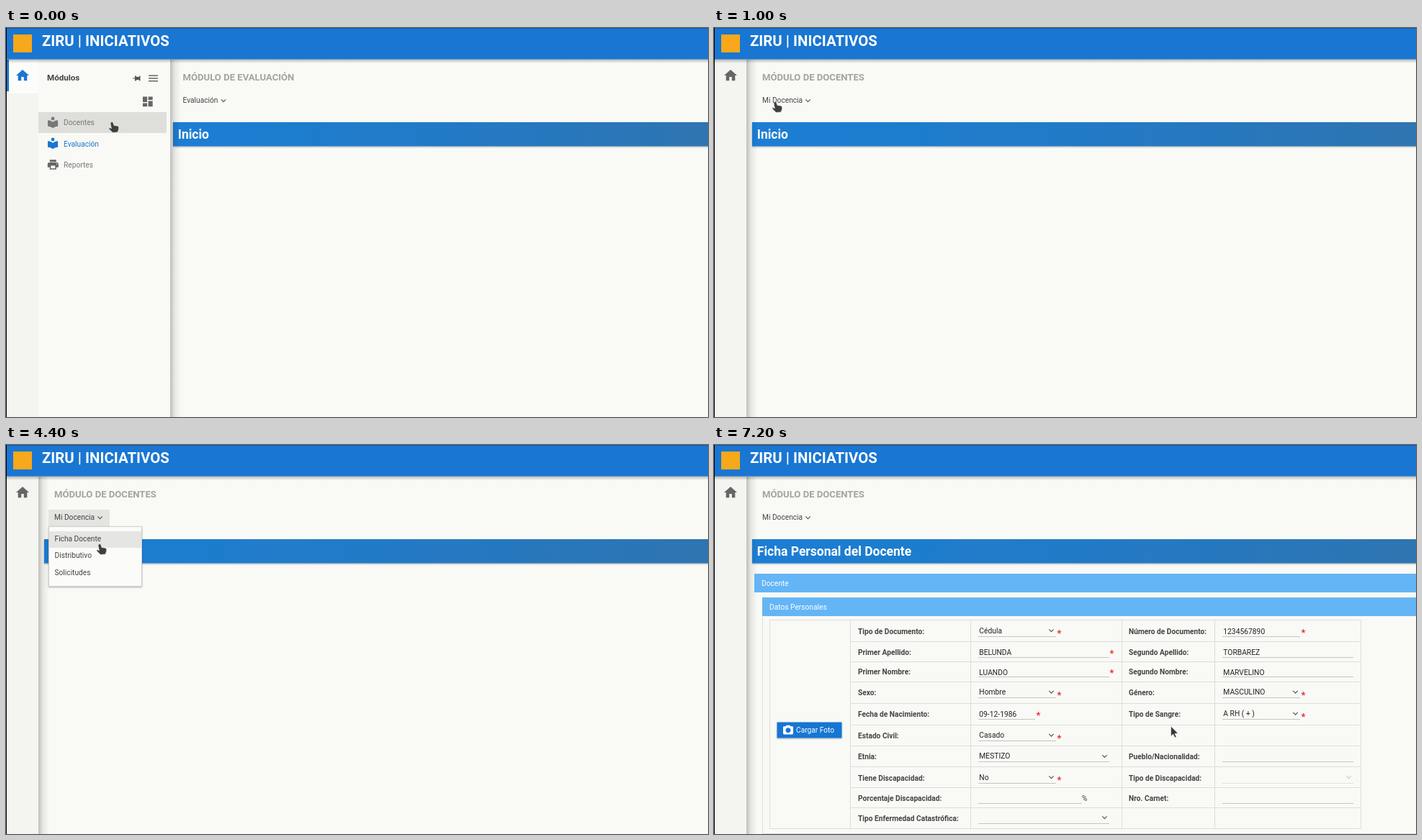
Recreate the animation shown at these times as an HTML page. Size 975 by 541 pixels, loop 7.3 s.

```html
<!DOCTYPE html>
<html lang="es">
<head>
<meta charset="utf-8">
<title>Módulo de docentes</title>
<style>
  html, body { margin: 0; width: 100%; height: 100%; overflow: hidden; background: #f9faf6; }
  svg { display: block; width: 975px; height: 541px; }
  text { font: 10.2px Roboto, sans-serif; fill: #444; white-space: pre; }
  .b { font-weight: 700; }
  .title { font-size: 20.4px; font-weight: 700; fill: #fff; }
  .module { font-size: 13.1px; font-weight: 700; fill: #a3a3a1; }
  .bar { font-size: 17.5px; font-weight: 700; fill: #fff; }
  .w { fill: #fff; }
  .v { font-size: 10.3px; fill: #222; }
  .req { font-size: 13px; font-weight: 700; fill: #f0252f; }
</style>
</head>
<body>
<svg id="stage" viewBox="0 0 975 541" xmlns="http://www.w3.org/2000/svg"></svg>
<script>
const LOOP = 7300, STEP = 100;
const BLUE = '#1976d2', GREY = '#666';

const ICON = {
  home: 'M10 20v-6h4v6h5v-8h3L12 3 2 12h3v8z',
  reader: 'M12 11.55C9.64 9.35 6.48 8 3 8v11c3.48 0 6.64 1.35 9 3.55 2.36-2.19 5.52-3.55 9-3.55V8c-3.48 0-6.64 1.35-9 3.55zM12 8c1.66 0 3-1.34 3-3s-1.34-3-3-3-3 1.34-3 3 1.34 3 3 3z',
  print: 'M19 8H5c-1.66 0-3 1.34-3 3v6h4v4h12v-4h4v-6c0-1.66-1.34-3-3-3zm-3 11H8v-5h8v5zm3-7c-.55 0-1-.45-1-1s.45-1 1-1 1 .45 1 1-.45 1-1 1zm-1-9H6v4h12V3z',
  tiles: 'M3 13h8V3H3v10zm0 8h8v-6H3v6zm10 0h8V11h-8v10zm0-18v6h8V3h-8z',
  camera: 'M9 2L7.17 4H4c-1.1 0-2 .9-2 2v12c0 1.1.9 2 2 2h16c1.1 0 2-.9 2-2V6c0-1.1-.9-2-2-2h-3.17L15 2H9zm3 15c-2.76 0-5-2.24-5-5s2.24-5 5-5 5 2.24 5 5-2.24 5-5 5z'
};

const rect = (x, y, w, h, fill, more = '') =>
  `<rect x="${x}" y="${y}" width="${w}" height="${h}" fill="${fill}" ${more}/>`;
const text = (x, y, s, cls = '', more = '') => `<text x="${x}" y="${y}" class="${cls}" ${more}>${s}</text>`;
const icon = (name, x, y, k, fill = GREY, more = '') =>
  `<path d="${ICON[name]}" transform="translate(${x} ${y}) scale(${k})" fill="${fill}" ${more}/>`;
const line = (d, color, w = 1) => `<path d="${d}" fill="none" stroke="${color}" stroke-width="${w}"/>`;
const chevron = (x, y, color = '#555') => line(`M${x - 3.2} ${y - 1.6}l3.2 3.2l3.2 -3.2`, color, 1.2);
const group = (id, body) => `<g id="${id}">${body}</g>`;

const brand = () => rect(10, 9, 26, 25, '#f8a81b') + text(50, 25, 'ZIRU | INICIATIVOS', 'title');

const heading = (x, module, menu, chevX) =>
  text(x, 72.5, module, 'module') + text(x, 104, menu) + chevron(chevX, 101);

const bar = (x, id = '') =>
  rect(x, 131, 990 - x, 33.5, 'url(#barFill)', 'filter="url(#soft)"') +
  text(x + 6.8, 153.5, 'Inicio', 'bar', id && `id="${id}"`);

const shade = x => rect(x, 44, 15, 497, 'url(#side)');

function evaluationPage() {
  return heading(245.5, 'MÓDULO DE EVALUACIÓN', 'Evaluación', 302) + bar(232) + shade(228) +
    rect(45, 44, 183, 497, '#f9f9f6') + rect(1, 44, 44, 497, '#f4f4f1') +
    rect(4, 44, 41, 47, '#fcfcfa') + rect(1, 44, 3, 44, BLUE) +
    icon('home', 12.2, 55.3, .9, BLUE) +
    text(57, 72.5, 'Módulos', 'b', 'style="font-size:11.6px"') +
    `<path d="M176 69.5h3v-3h1.5l1 1.5h3l1 -1.5h1v7h-1l-1 -1.5h-3l-1 1.5h-1.5v-3h-3z" fill="#555"/>` +
    line('M198 66.2h13M198 70h13M198 73.8h13', GREY, 1.5) +
    icon('tiles', 187.7, 93.2, .76) +
    rect(45, 117, 178, 29, '#dededb') +
    icon('reader', 55.7, 122, .78, GREY, 'id="teachIcon"') +
    text(80, 135.3, 'Docentes', '', 'id="teachText"') +
    icon('reader', 55.7, 151, .78, BLUE, 'id="evalIcon"') +
    text(80, 164.5, 'Evaluación', '', 'id="evalText"') +
    icon('print', 56.3, 181, .75) + text(80, 193.7, 'Reportes', '', 'style="fill:#777"');
}

function teachingPage() {
  return rect(59, 90, 85, 23, '#e4e4e1', 'id="menuHover"') +
    heading(67, 'MÓDULO DE DOCENTES', 'Mi Docencia', 130.5) + bar(53, 'barText') +
    shade(45) + rect(1, 44, 44, 497, '#f4f4f1') + icon('home', 12.2, 55.3, .9);
}

function menu() {
  const items = ['Ficha Docente', 'Distributivo', 'Solicitudes'];
  return rect(59.5, 113.5, 129, 83, '#fbfbf9', 'stroke="#cfcfcf" filter="url(#soft)"') +
    rect(60, 120, 128, 23, '#e5e5e3', 'id="hover"') +
    items.map((s, i) => text(67.5, 133.8 + i * 23.4, s)).join('');
}

// Row fields: [label, kind, value, required], for the left and right columns.
const ROWS = [
  [259, ['Tipo de Documento:', 'select', 'Cédula', 1], ['Número de Documento:', 'short', '1234567890', 1]],
  [288, ['Primer Apellido:', 'input', 'BELUNDA', 1], ['Segundo Apellido:', 'input', 'TORBAREZ']],
  [315.7, ['Primer Nombre:', 'input', 'LUANDO', 1], ['Segundo Nombre:', 'input', 'MARVELINO']],
  [344.5, ['Sexo:', 'select', 'Hombre', 1], ['Género:', 'select', 'MASCULINO', 1]],
  [374.5, ['Fecha de Nacimiento:', 'date', '09-12-1986', 1], ['Tipo de Sangre:', 'select', 'A RH ( + )', 1]],
  [404.5, ['Estado Civil:', 'select', 'Casado', 1]],
  [433.7, ['Etnia:', 'wide', 'MESTIZO'], ['Pueblo/Nacionalidad:', 'input', '']],
  [463, ['Tiene Discapacidad:', 'select', 'No', 1], ['Tipo de Discapacidad:', 'off', '']],
  [491.5, ['Porcentaje Discapacidad:', 'percent', ''], ['Nro. Carnet:', 'input', '']],
  [519, ['Tipo Enfermedad Catastrófica:', 'wide', '']]
];
const WIDTH = { select: 108, short: 108, input: 182, wide: 182, off: 182, date: 79, percent: 144 };

function field(y, right, [label, kind, value, required]) {
  const x = right ? 706 : 367, w = WIDTH[kind];
  const isSelect = kind === 'select' || kind === 'wide' || kind === 'off';
  const faint = kind === 'off';
  const up = isSelect ? 1.3 : 0;
  let s = text(right ? 576 : 200, y + 3.7, label, 'b') +
    text(x + 1.3, y + 3.9 - up, value, 'v') +
    line(`M${x} ${Math.round(y + 6.5) + .5}h${w}`, faint ? '#e2e2e2' : '#c4c4c4');
  if (isSelect) s += chevron(x + w - 6.5, y - 1, faint ? '#ccc' : '#555');
  if (kind === 'percent') s += text(511, y + 3.5, '%');
  if (required) s += text(x + (kind === 'input' ? w + .5 : w + 1.5), y + (isSelect ? 7 : 5.5), '*', 'req');
  return s;
}

function form() {
  const ys = [244, 274, 302, 330, 360, 390, 419, 448, 477, 505, 534];
  const xs = [189, 356, 566, 695];
  const grid = ys.map((y, i) => `M${i % 10 ? 189 : 77} ${y - .5}H898`).join('') +
    xs.map(x => `M${x}.5 243.5V534`).join('') + 'M77.5 243.5V534M898.5 243.5V534';
  return rect(56, 179, 919, 26, '#64b5f6') + text(66, 195.6, 'Docente', 'w') +
    rect(67, 212, 908, 26, '#64b5f6') + text(77, 228.6, 'Datos Personales', 'w') +
    line('M67.5 238V540.5H975', '#dededc') + line(grid, '#dddddb') +
    rect(87.5, 385.5, 90, 22, BLUE, 'filter="url(#soft)"') +
    icon('camera', 94.6, 388.4, .7, '#fff') + text(114, 400.2, 'Cargar Foto', 'w') +
    ROWS.map(([y, ...cols]) => cols.map((c, i) => field(y, i, c)).join('')).join('');
}

function loading() {
  return rect(0, 0, 975, 541, '#4e4e4e', 'opacity=".75"') +
    `<g opacity=".55">${brand()}</g>` +
    rect(552, 257, 66, 46, '#fff', 'filter="url(#lift)"') +
    `<circle id="spin" cx="585" cy="280" r="10" fill="none" stroke="#f8c51c" stroke-width="3" pathLength="100" stroke-dasharray="88 12"/>`;
}

const stage = document.getElementById('stage');
stage.innerHTML = `<defs>
  <linearGradient id="barFill"><stop stop-color="#1b7ed4"/><stop offset=".5" stop-color="#237ac6"/><stop offset="1" stop-color="#2f74b0"/></linearGradient>
  <linearGradient id="side"><stop stop-color="#000" stop-opacity=".24"/><stop offset=".4" stop-color="#000" stop-opacity=".08"/><stop offset="1" stop-color="#000" stop-opacity="0"/></linearGradient>
  <linearGradient id="under" x2="0" y2="1"><stop stop-color="#000" stop-opacity=".28"/><stop offset="1" stop-color="#000" stop-opacity="0"/></linearGradient>
  <filter id="soft"><feDropShadow dx="0" dy="1" stdDeviation="1" flood-opacity=".3"/></filter>
  <filter id="lift" x="-50%" y="-50%" width="200%" height="200%"><feDropShadow dx="0" dy="4" stdDeviation="4" flood-opacity=".5"/></filter>
</defs>` +
  rect(0, 0, 975, 541, '#f9faf6') +
  group('evaluation', evaluationPage()) + group('teaching', teachingPage()) +
  group('form', form()) + group('menu', menu()) +
  rect(0, 43, 975, 6, 'url(#under)') + rect(0, 0, 975, 43.5, BLUE) + rect(0, 0, 975, 1, '#155a9f') + brand() +
  group('loading', loading()) +
  rect(0, 0, 1, 541, '#000') +
  `<path id="hand" d="M-1 0C.5 -1 1.5 0 2 1.5L3 4.5L8 5.2Q10 5.8 9.8 8L9.2 11L8 14L1.2 14.5L-3.4 10C-5 8 -3.4 7 -1.8 8.2L-.6 8.8L-2 2Q-2.2 .6 -1 0z" fill="#3f3f3f" stroke="#f4f4f4" stroke-width=".6"/>
   <path id="arrow" d="M0 0L0 14L3.2 11.2L5.6 16L7.8 15L5.6 10.4L10 10z" fill="#3a3a3a" stroke="#eee" stroke-width=".8"/>`;

const el = {};
for (const node of stage.querySelectorAll('[id]')) el[node.id] = node;

// Pointer tip: [ms, x, y]
const PATH = [
  [0, 147, 131], [100, 148, 132], [400, 151.5, 133], [900, 86, 104], [1000, 85, 103],
  [1400, 86, 104], [1900, 138, 131], [3700, 138, 131], [3800, 137.5, 131], [4100, 137, 132],
  [4400, 130, 138], [4800, 124, 158], [5200, 124, 172], [5500, 125, 170], [5800, 125, 164],
  [6200, 108, 132], [6600, 108, 132], [7200, 634.5, 391], [7300, 634.5, 391]
];

function pointer(t) {
  const i = PATH.findIndex((p, k) => k && t <= p[0]);
  const [t0, x0, y0] = PATH[i - 1], [t1, x1, y1] = PATH[i];
  const u = (t - t0) / (t1 - t0), e = u * u * (3 - 2 * u);
  return [x0 + (x1 - x0) * e, y0 + (y1 - y0) * e];
}

const show = (node, on) => { node.style.display = on ? '' : 'none'; };

function draw(t) {
  const [x, y] = pointer(t);
  const isTeaching = t >= 800, isForm = t >= 6700, isOpen = t >= 1300 && t < 6600;
  const isLoading = t >= 400 && t < 800, isArrow = (t >= 400 && t < 900) || t >= 6700;

  show(el.evaluation, !isTeaching);
  show(el.teaching, isTeaching);
  show(el.form, isForm);
  show(el.menu, isOpen);
  show(el.loading, isLoading);
  show(el.menuHover, t >= 1100 && t < 6600);

  el.barText.textContent = isForm ? 'Ficha Personal del Docente' : 'Inicio';
  el.menu.style.opacity = Math.min(1, (t - 1200) / 200);
  el.teachIcon.style.fill = el.teachText.style.fill = t >= 200 ? BLUE : '#777';
  el.evalIcon.style.fill = el.evalText.style.fill = t >= 400 ? '#777' : BLUE;

  const row = Math.floor((y - 120) / 23.4);
  show(el.hover, row >= 0 && row < 3);
  el.hover.setAttribute('y', 120 + row * 23.4);

  el.spin.setAttribute('transform', `rotate(${-68 + (t - 400) * .45} 585 280)`);
  show(el.hand, !isArrow);
  show(el.arrow, isArrow);
  const small = isLoading ? ' scale(.8)' : '';
  (isArrow ? el.arrow : el.hand).setAttribute('transform', `translate(${x} ${y})${small}`);
}

const start = performance.now();
function tick() {
  const t = (performance.now() - start) % LOOP;
  draw(Math.floor(t / STEP) * STEP);
  requestAnimationFrame(tick);
}
tick();
</script>
</body>
</html>
```
